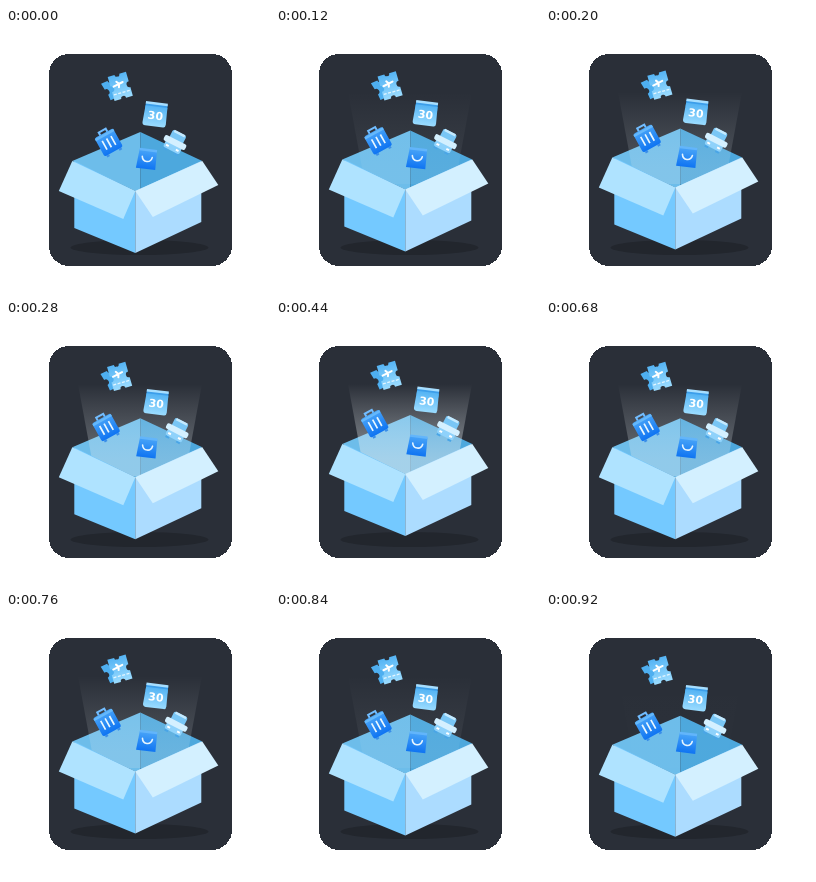
Recreate the animation shown at these times as an HTML page. Size 264 px wide and 264 px high, loop 0.96 s.

```html
<!DOCTYPE html>
<html lang="en">
<head>
<meta charset="utf-8">
<style>
  html, body { margin: 0; width: 100%; height: 100%; overflow: hidden; background: #fff; }
  svg { display: block; width: 100%; height: 100%; }
  text { font: bold 11px "DejaVu Sans", sans-serif; }
</style>
</head>
<body>
<svg viewBox="0 0 264 264">
  <defs>
    <linearGradient id="beamFill" gradientUnits="userSpaceOnUse" x1="0" y1="64" x2="0" y2="140">
      <stop offset="0" stop-color="#fff" stop-opacity="0"/>
      <stop offset="1" stop-color="#d8e4ea" stop-opacity=".53"/>
    </linearGradient>
    <linearGradient id="paleFill" x2="0" y2="1">
      <stop offset="0" stop-color="#55b4f4"/><stop offset="1" stop-color="#9bdcff"/>
    </linearGradient>
    <linearGradient id="deepFill" x2="0" y2="1">
      <stop offset="0" stop-color="#48a4f8"/><stop offset="1" stop-color="#0f74f2"/>
    </linearGradient>
  </defs>

  <rect x="43" y="26" width="183" height="212" rx="20" fill="#2a2f38" shape-rendering="crispEdges"/>
  <ellipse cx="133.5" cy="219.5" rx="69" ry="7.5" fill="#22262d"/>

  <g class="box">
    <path d="M66 132 134 103V162H129Z" fill="#6dbdea"/>
    <path d="M134 103 196 132 134 162Z" fill="#4da8dd"/>
  </g>
  <path id="beam" d="M72 64H196L179 156H89Z" fill="url(#beamFill)"/>

  <g id="ticket">
    <path d="M-12-10H-5A2.5 2.5 0 0 0 0-10H6V9H-10V3A3 3 0 0 0-11-3Z" fill="#4eaff0" transform="translate(-2) rotate(-8)"/>
    <path d="M-9-13H-2A2.5 2.5 0 0 0 3-13H10V-3A3 3 0 0 0 10 3V12H3A2.5 2.5 0 0 0-2 12H-9V3A3 3 0 0 0-9-3Z" fill="url(#paleFill)" transform="translate(2)"/>
    <path d="M-4-2 6-4M0-6 2-3 1 0" fill="none" stroke="#fff" stroke-width="2" stroke-linecap="round"/>
    <path d="M-6 6H11" stroke="#e4f6ff" stroke-width="1.3" stroke-dasharray="3 1.5"/>
  </g>

  <g id="calendar">
    <path d="M-11-11H11V-4H-11Z" fill="#3c9eea"/>
    <path d="M-11-8H11L11.5 9Q11.5 12 9 12H-9Q-12 12-12 9Z" fill="url(#paleFill)"/>
    <path d="M-11-11H11" stroke="#a6deff" stroke-width="2.5"/>
    <text y="5" text-anchor="middle" fill="#fff">30</text>
  </g>

  <g id="suitcase">
    <path d="M-4-9V-13H4V-9" fill="none" stroke="#72bdff" stroke-width="2"/>
    <path d="M-7 11V13M7 11V13" stroke="#3b8ee8" stroke-width="3"/>
    <rect x="-10.5" y="-10" width="21" height="21" rx="2" fill="url(#deepFill)"/>
    <path d="M-10.5-8H10.5" stroke="#65b8fb" stroke-width="2.5"/>
    <path d="M-5-4V6M0-4V6M5-4V6" stroke="#e9f7ff" stroke-width="1.7"/>
  </g>

  <g id="car">
    <path d="M-6 8V11M6 8V11" stroke="#4aa5e6" stroke-width="4"/>
    <rect x="-7.5" y="-11" width="15" height="10" rx="2" fill="#79c6f5"/>
    <path d="M-6-10H6" stroke="#c4eaff" stroke-width="2.5"/>
    <rect x="-9" y="0" width="18" height="9" rx="2" fill="#8fd2fb"/>
    <rect x="-12" y="-3" width="24" height="6" rx="2" fill="#d4f0ff"/>
    <path d="M-7 6H-4M4 6H7" stroke="#fff" stroke-width="2"/>
  </g>

  <g id="bag">
    <path d="M-8.5-9H9L9.5 10H-10Z" fill="url(#deepFill)"/>
    <path d="M-8.5-9H9" stroke="#62b5fb" stroke-width="2.5"/>
    <path d="M-5-2C-4 4 4 4 5-2" fill="none" stroke="#e6f5ff" stroke-width="1.6" stroke-linecap="round"/>
  </g>

  <g class="box">
    <path d="M68 132 129 162V224L68 199Z" fill="#74c9ff"/>
    <path d="M129 162 195 132V193L129 224Z" fill="#acdcff"/>
    <path d="M66 132 129 162 117 190 52.5 162Z" fill="#afe3ff"/>
    <path d="M196 132 129 162 146.5 188 212 156Z" fill="#d3f0ff"/>
  </g>
</svg>
<script>
  const PERIOD = 960, STEP = 40;
  // Resting x, y, angle and the offset at the top of the bob.
  const icons = {
    ticket: [112, 59.5, -16, -1, -3],
    calendar: [149.5, 86.5, 7, 1.5, -6.5],
    suitcase: [102.5, 114, -29, -4, -11],
    car: [169, 114.5, 27, 3.5, -6],
    bag: [141, 131, 7, 0.5, -5.5]
  };
  const byId = id => document.getElementById(id);
  const boxes = document.querySelectorAll('.box');

  function draw(now) {
    const time = Math.floor(now % PERIOD / STEP) * STEP;
    const lift = (1 - Math.cos(time / PERIOD * 2 * Math.PI)) / 2;
    for (const box of boxes) box.setAttribute('transform', `translate(.3 ${0.9 - 9 * lift})`);
    for (const [id, [x, y, angle, dx, dy]] of Object.entries(icons)) {
      byId(id).setAttribute('transform',
        `translate(${x + dx * lift} ${y + dy * lift}) rotate(${angle})`);
    }
    byId('beam').setAttribute('opacity', lift);
  }

  const start = performance.now();
  function loop() {
    draw(performance.now() - start);
    requestAnimationFrame(loop);
  }
  loop();
</script>
</body>
</html>
```
